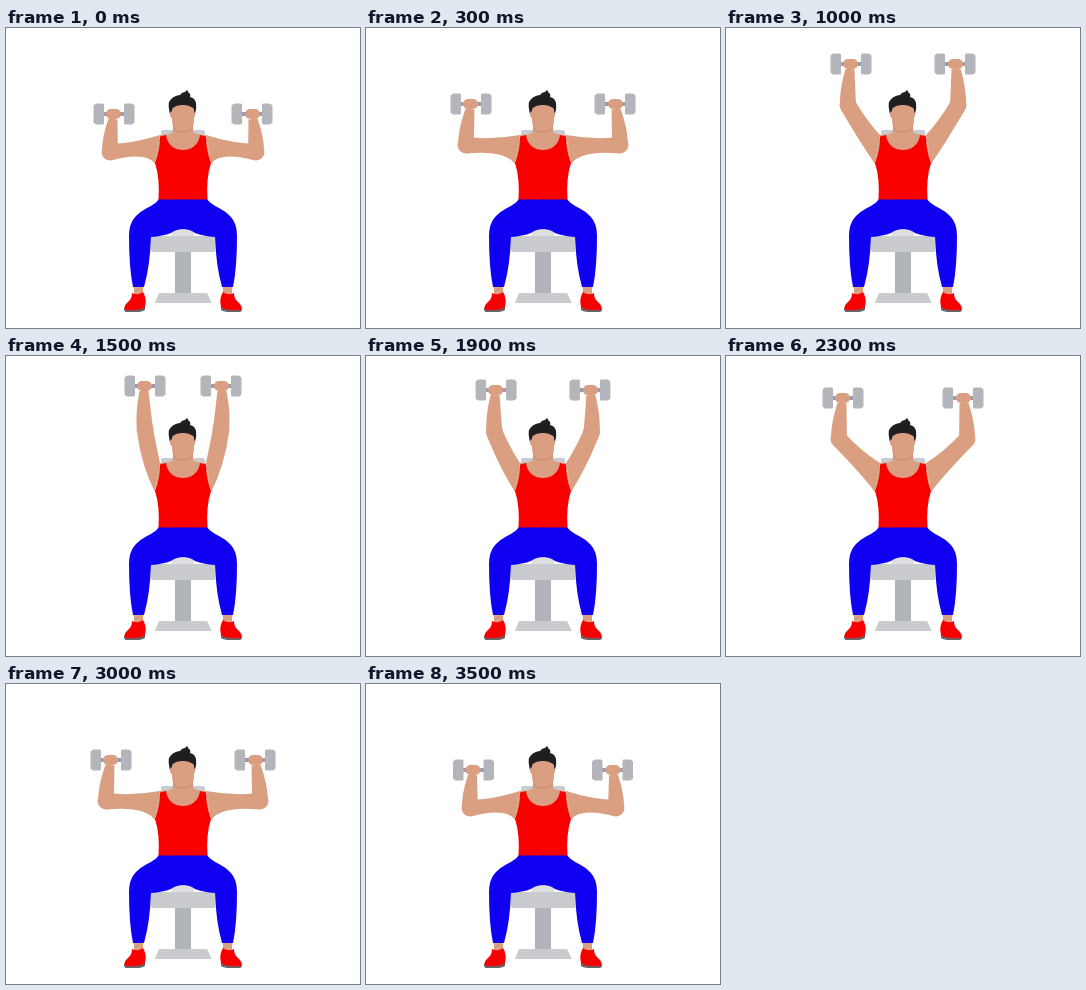
An HTML page with a canvas for the animation above (3600 ms loop, 354 by 300 pixels).

```html
<!DOCTYPE html>
<html lang="en">
<head>
<meta charset="utf-8">
<title>Seated dumbbell press</title>
<style>
html, body { margin: 0; width: 100%; height: 100%; overflow: hidden; background: #fff; }
canvas { display: block; }
</style>
</head>
<body>
<canvas id="stage" width="354" height="300"></canvas>
<script>
const ctx = document.getElementById('stage').getContext('2d');
const LOOP = 3600, STEP = 100, MID = 177;
const SKIN = '#d99f80', SHADE = '#cd9074', RED = '#f80000', BLUE = '#1000f2';
const SEAT = '#c9cbce', STEM = '#b1b4b8', PLATE = '#b4b5ba', BAR = '#9b9bb0', HAIR = '#1f1e20';

// Left arm poses: time, elbow x y, grip x y
const poses = [
  [0, 104, 124, 108, 86],
  [300, 100, 117, 105, 76],
  [650, 104, 99, 109, 55],
  [1000, 122, 77, 125, 36],
  [1500, 139, 73, 139, 30],
  [2300, 113, 83, 117, 42],
  [2650, 103, 100, 108, 57],
  [3000, 100, 117, 105, 76],
  [3500, 104, 124, 107.5, 86]
];

function poseKey(i) {
  const n = poses.length, turn = Math.floor(i / n);
  const [t, ...p] = poses[i - turn * n];
  return { t: t + turn * LOOP, p };
}

// Smooth periodic curve through the poses
function poseAt(t) {
  let i = 0;
  while (poseKey(i + 1).t <= t) i++;
  const [a, b, c, d] = [i - 1, i, i + 1, i + 2].map(poseKey);
  const span = c.t - b.t, u = (t - b.t) / span, u2 = u * u, u3 = u2 * u;
  return b.p.map((v, k) => {
    const m0 = (c.p[k] - a.p[k]) / (c.t - a.t) * span;
    const m1 = (d.p[k] - b.p[k]) / (d.t - b.t) * span;
    return (2 * u3 - 3 * u2 + 1) * v + (u3 - 2 * u2 + u) * m0
      + (3 * u2 - 2 * u3) * c.p[k] + (u3 - u2) * m1;
  });
}

function shape(color, d) {
  ctx.fillStyle = color;
  ctx.fill(new Path2D(d));
}

function box(color, x, y, w, h, r = 0) {
  ctx.fillStyle = color;
  ctx.beginPath();
  ctx.roundRect(x, y, w, h, r);
  ctx.fill();
}

// Gives points at a share of a bone's length, moved sideways off it
function bone(x1, y1, x2, y2) {
  const dx = x2 - x1, dy = y2 - y1, len = Math.hypot(dx, dy);
  return (share, off) => [x1 + dx * share - dy / len * off, y1 + dy * share + dx / len * off];
}

// Two curved sides, joined by straight ends
function muscle(a, ca, b, c, cc, d) {
  shape(SKIN, `M${a}Q${ca} ${b}L${c}Q${cc} ${d}Z`);
}

function arm(ex, ey, gx, gy) {
  box(BAR, gx - 11, gy - 2, 22, 4);
  for (const s of [-1, 1]) {
    box(PLATE, gx + s * 18 - 2.5, gy - 9.5, 5, 19, 1.5);
    box(PLATE, gx + s * 14.5 - 4.5, gy - 10.5, 9, 21, 1.5);
  }
  const upper = bone(ex, ey, 152, 119), fore = bone(ex, ey, gx - 1, gy + 5);
  const lift = (119 - ey) / Math.hypot(152 - ex, 119 - ey);
  const bulge = 3 + 11 * Math.max(0, lift);
  muscle(upper(0, 8.5), upper(0.75, bulge), [149, 136], [154, 107], upper(0.5, -6), upper(0, -8));
  muscle(fore(0, -8), fore(0.4, -9.5), fore(1, -4.5), fore(1, 4.5), fore(0.4, 6.5), fore(0, 8));
  box(SKIN, ex - 8.5, ey - 8.5, 17, 17, 8.5);
  box(SKIN, gx - 8, gy - 5, 15, 10, 5);
}

function bench() {
  box(SEAT, 155, 102, 44, 14, 2);
  box(STEM, 169, 222, 16, 45);
  shape(SEAT, 'M153 265H201L206 275H149Z');
  box('#dddee1', 166, 200, 22, 10);
  box(SEAT, 145, 208, 64, 16, 1);
}

function leg() {
  box(SKIN, 128, 256, 9, 13);
  shape(BLUE, `M178 171.5H152.5Q151 175 141 180Q135 183 130 188Q123 195 123 208
    Q123 240 127 259H138Q144 238 145 209Q157 208 165 205Q170 201 178 201Z`);
  shape('#6b6265', 'M118 280L139 278V282Q136 284 130 284H120Q118 284 118 280Z');
  shape(RED, 'M126 265Q132 268 137 264Q141 270 139 279Q135 282 130 282H119Q117 278 122 274Q126 271 126 265Z');
}

function torso() {
  shape(SKIN, 'M167 95H187V104Q190 107 200 107L205 136H149L154 107Q164 107 167 104Z');
  shape(RED, `M154 108.5L160 107C161 116 168 122 177 122S193 116 194 107L200 108.5
    Q200 123 205 135Q200 150 201.5 172H152.5Q154 150 149 135Q154 123 154 108.5Z`);
}

function head() {
  shape(SHADE, 'M167 97H187V102Q177 107 167 102Z');
  shape(HAIR, `M164 86Q162 78 163 74Q166 68 174 67Q176 64 179 64L181 62L183 65Q185 66 184 69
    Q189 70 190 75Q191 80 189 86Z`);
  box(SKIN, 164, 83, 25, 7, 3);
  shape(SKIN, 'M166 81Q169 77 177 77Q184 77 188 81V93Q188 101 181 103H173Q166 101 166 93Z');
}

function draw(now) {
  const pose = poseAt(Math.floor(now % LOOP / STEP) * STEP);
  ctx.fillStyle = '#fff';
  ctx.fillRect(0, 0, 354, 300);
  bench();
  bothSides(() => arm(...pose));
  torso();
  bothSides(leg);
  head();
}

function bothSides(part) {
  part();
  ctx.save();
  ctx.translate(2 * MID, 0);
  ctx.scale(-1, 1);
  part();
  ctx.restore();
}

const start = performance.now();
function tick() {
  draw(performance.now() - start);
  requestAnimationFrame(tick);
}
tick();
</script>
</body>
</html>
```
